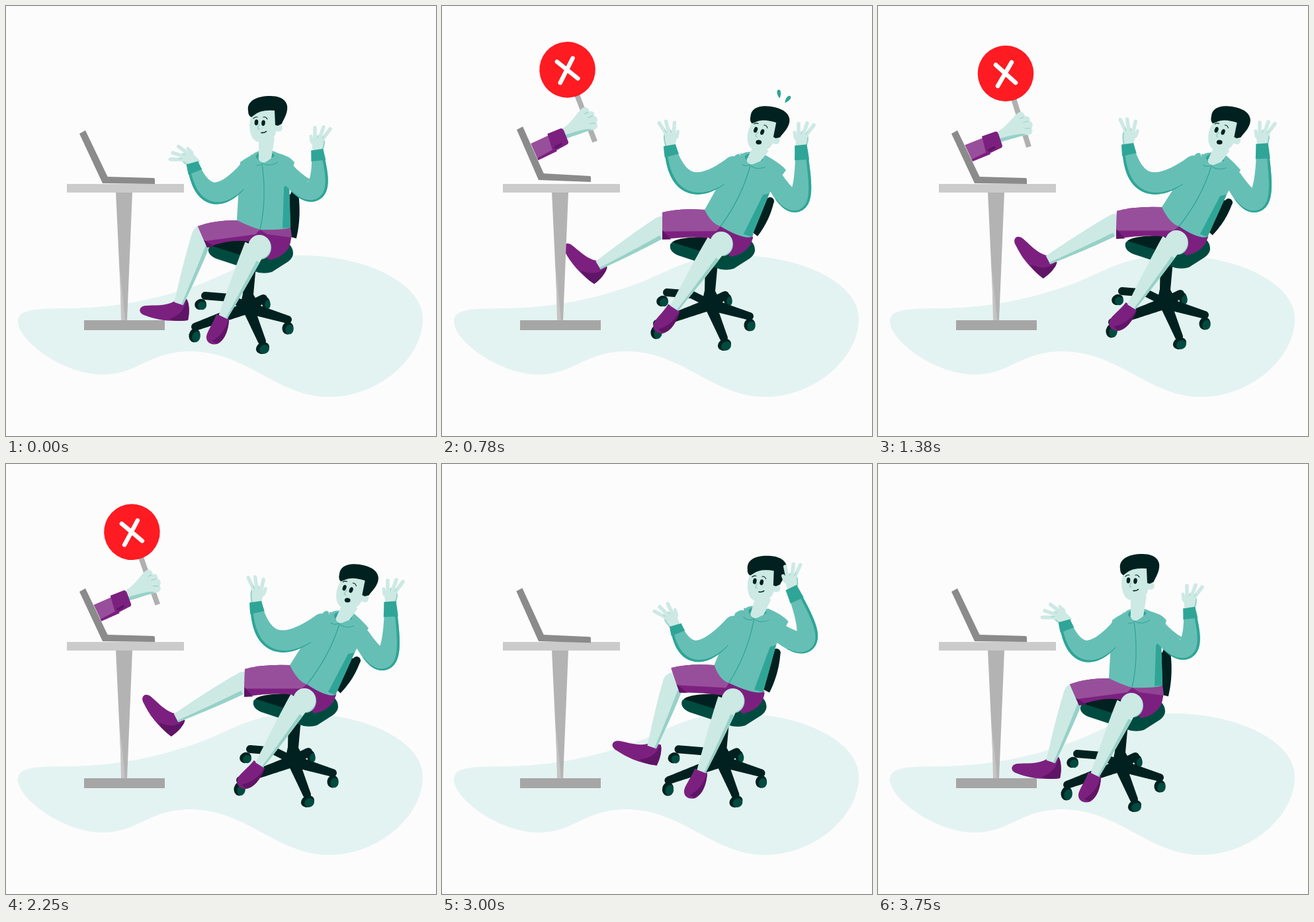
Animation of 650 by 650 pixels, one loop 4.53 s. Source, as an HTML page with a canvas:

```html
<!DOCTYPE html>
<html lang="en">
<head>
<meta charset="utf-8">
<title>Office chair</title>
<style>
html, body { margin: 0; width: 100%; height: 100%; overflow: hidden; background: #fcfcfc; }
canvas { display: block; width: 650px; height: 650px; }
</style>
</head>
<body>
<canvas id="stage" width="650" height="650"></canvas>
<script>
const ctx = document.getElementById('stage').getContext('2d');
const LOOP = 4530, STEP = 30;
const C = {
  bg: '#fcfcfc', floor: '#e3f3f1', skin: '#cde9e4', skinDark: '#97d1c8',
  teal: '#66bfb5', tealDark: '#2fa597', lilac: '#984f9b', plum: '#7c2080', plumDark: '#5f1565',
  dark: '#00211f', green: '#004b40', red: '#fe1b22',
  top: '#cbcbcb', leg: '#b3b3b3', foot: '#a6a6a6', laptop: '#8b8b8b'
};

// Body poses; every entry is blended number by number.
const sitting = {
  chair: [0, 0], back: [437, 284], head: [384, 176, 0], neck: [391, 230, 0],
  sL: [354, 236], wL: [349, 324], zip: [384, 338], hem: [430, 335], pit: [428, 268], sR: [436, 236],
  armL: [366, 247, 316, 283, 283, 242], handL: [286, 237, -52],
  armR: [425, 252, 466, 278, 471, 223], handR: [471, 219, 0],
  k1: [290, 333], k2: [304, 365], knee: [297, 347], kick: [261, 450, 0],
  step: [328, 470, 0], gasp: [0]
};
const shocked = {
  chair: [39, -5], back: [497, 294], head: [479.5, 188.5, 14], neck: [470, 233, 14],
  sL: [443, 226], wL: [397, 308], zip: [421, 333], hem: [468, 349], pit: [495, 283], sR: [520, 248],
  armL: [440, 241, 378, 267, 345, 216], handL: [345, 211, 4],
  armR: [502, 262, 538, 293, 543, 218], handR: [543, 213, 0],
  k1: [333, 312], k2: [333, 353], knee: [332, 334], kick: [236, 392, 41],
  step: [351, 457, 13], gasp: [1]
};
const recoiled = {
  chair: [68, -7], back: [531, 296], head: [517, 188.5, 14], neck: [508, 234, 14],
  sL: [480, 224], wL: [429, 304], zip: [455, 333], hem: [498, 349], pit: [527, 285], sR: [548, 248],
  armL: [477, 240, 410, 267, 378, 214], handL: [378, 208, 12],
  armR: [537, 262, 574, 293, 581, 216], handR: [581, 211, 0],
  k1: [361, 310], k2: [360, 352], knee: [359, 330], kick: [257, 384, 44],
  step: [383, 455, 18], gasp: [1]
};
const relaxing = {
  chair: [68, -7], back: [525, 288], head: [496.5, 182, 8], neck: [490, 228, 12],
  sL: [460, 224], wL: [425, 303], zip: [448, 331], hem: [497, 346], pit: [520, 275], sR: [540, 238],
  armL: [457, 242, 397, 280, 367, 234], handL: [366, 230, 2],
  armR: [525, 254, 563, 278, 556, 204], handR: [556, 199, 0],
  k1: [360, 301], k2: [367, 342], knee: [363, 325], kick: [297, 408, 30],
  step: [395, 461, 14], gasp: [0]
};
const wondering = {
  chair: [32, -6], back: [476, 282], head: [452, 175, 2], neck: [455, 226, 8],
  sL: [420, 228], wL: [387, 307], zip: [412, 331], hem: [462, 343], pit: [479, 272], sR: [495, 238],
  armL: [418, 245, 373, 284, 334, 256], handL: [332, 253, -50],
  armR: [485, 256, 532, 255, 502, 187], handR: [500, 182, -25],
  k1: [320, 322], k2: [340, 353], knee: [324, 341], kick: [328, 444, 2],
  step: [383, 468, -9], gasp: [0]
};
const BODY = [[380, sitting], [780, shocked], [1140, recoiled], [2290, recoiled],
              [2670, relaxing], [3360, wondering], [3740, sitting]];
// grip x, grip y, scale, angle
const SIGN = [[120, [110, 235, .1, 45]], [330, [168, 228, .82, 38]], [540, [210, 184, 1, 4]],
  [690, [215, 170, 1, -4]], [780, [215, 170, 1, -3.4]], [960, [214, 178, 1, 3]], [1140, [214, 176, 1, -2]],
  [1380, [214, 177, 1, 0]], [2249, [214, 177, 1, 0]], [2250, [214, 177, 1, -2]],
  [2400, [214, 178, 1, -5]], [2670, [172, 226, .84, 38]], [2880, [110, 235, .1, 45]]];
// lift, angle
const LAPTOP = [[120, [0, 0]], [570, [-3, 1]], [780, [-5, 1.5]], [930, [0, -3]], [1110, [0, 0]],
  [2300, [0, 0]], [2670, [0, -4.2]], [2790, [0, -5]], [3000, [0, 1]], [3180, [0, 0]]];
const SPARK = [[620, [0]], [740, [1]], [840, [1]], [960, [0]]];

// Monotone cubic through keyed values.
function spline(ts, vs, t) {
  const n = ts.length - 1;
  if (t <= ts[0]) return vs[0];
  if (t >= ts[n]) return vs[n];
  let i = 0;
  while (t > ts[i + 1]) i++;
  const slope = k => (vs[k + 1] - vs[k]) / (ts[k + 1] - ts[k]);
  const tangent = k => {
    if (k === 0 || k === n) return 0;
    const a = slope(k - 1), b = slope(k);
    return a * b <= 0 ? 0 : 2 * a * b / (a + b);
  };
  const h = ts[i + 1] - ts[i], u = (t - ts[i]) / h, v = 1 - u;
  return vs[i] * v * v * (1 + 2 * u) + vs[i + 1] * u * u * (3 - 2 * u)
    + h * u * v * (tangent(i) * v - tangent(i + 1) * u);
}
function blend(keys, t) {
  const ts = keys.map(k => k[0]);
  return keys[0][1].map((_, j) => spline(ts, keys.map(k => k[1][j]), t));
}
function bodyAt(t) {
  const p = {};
  for (const name in sitting) p[name] = blend(BODY.map(([at, pose]) => [at, pose[name]]), t);
  return p;
}

const mix = (a, b, u) => [a[0] + (b[0] - a[0]) * u, a[1] + (b[1] - a[1]) * u];
function local(x, y, deg, scale, draw) {
  ctx.save();
  ctx.translate(x, y);
  ctx.rotate(deg * Math.PI / 180);
  ctx.scale(scale, scale);
  draw();
  ctx.restore();
}
function shape(d, color) {
  ctx.fillStyle = color;
  ctx.fill(new Path2D(d));
}
function poly(pts, color) {
  ctx.fillStyle = color;
  ctx.beginPath();
  pts.forEach(p => ctx.lineTo(p[0], p[1]));
  ctx.closePath();
  ctx.fill();
}
function oval(x, y, rx, ry, color, rot = 0) {
  ctx.fillStyle = color;
  ctx.beginPath();
  ctx.ellipse(x, y, rx, ry, rot, 0, 7);
  ctx.fill();
}
function line(d, color, width, cap = 'round') {
  ctx.strokeStyle = color;
  ctx.lineWidth = width;
  ctx.lineCap = cap;
  ctx.lineJoin = 'round';
  ctx.stroke(new Path2D(d));
}
// Band along a curve through m, between side offsets a(t) and b(t).
function band(p, m, q, a, b, color, t0 = 0, t1 = 1) {
  const c = [2 * m[0] - (p[0] + q[0]) / 2, 2 * m[1] - (p[1] + q[1]) / 2];
  const near = [], far = [];
  for (let i = 0; i <= 24; i++) {
    const t = t0 + (t1 - t0) * i / 24;
    const s = mix(p, c, t), e = mix(c, q, t), o = mix(s, e, t);
    const len = Math.hypot(e[0] - s[0], e[1] - s[1]) || 1;
    const nx = (s[1] - e[1]) / len, ny = (e[0] - s[0]) / len;
    near.push([o[0] + nx * a(t), o[1] + ny * a(t)]);
    far.unshift([o[0] + nx * b(t), o[1] + ny * b(t)]);
  }
  poly(near.concat(far), color);
}

function drawFloor() {
  ctx.fillStyle = C.bg;
  ctx.fillRect(0, 0, 650, 650);
  shape('M18 477C18 456 50 458 100 457C180 455 240 440 300 418C345 400 375 377 445 377C545 377 630 420 630 472C630 535 560 591 489 591C410 591 365 523 280 522C215 522 200 557 146 557C85 557 18 505 18 477Z', C.floor);
}

function drawTable() {
  shape('M166 281H191L183 475H175Z', C.leg);
  shape('M172 395L180 475H174Z', '#c4c4c4');
  shape('M118 475H240V490H118Z', C.foot);
  shape('M92 269H269V282H92Z', C.top);
}

function drawSign([x, y, s, rot]) {
  local(x, y, rot, s, () => {
    line('M-21-75L14 36', '#b0b0b0', 8, 'butt');
    oval(-21, -75, 42.3, 42.3, C.red);
    line('M-36-88L-6-61M-12-92L-33-56', '#fff', 6.5);
    shape('M-100 40L-52 21L-46 47L-94 65Z', C.lilac);
    shape('M-73 55L-46 42L-44 47L-76 60Z', C.plum);
    shape('M-37 15C-22 8-14-5-3-15C2-19 8-16 8-10C14-12 17-7 15-3C20-2 21 4 18 8C22 13 17 19 10 18C0 20-12 24-31 29Z', C.skin);
    shape('M-31 29C-12 24 0 20 10 18C8 14-8 17-33 24Z', C.skinDark);
    line('M6-9L1-7M13-3L6-1M16 8L8 8', C.skinDark, 1.2);
    shape('M-57 20L-37 13Q-34 12-32 16L-26 34Q-26 37-29 38L-50 48Z', C.plum);
    line('M-46 41L-38 37', C.plumDark, 4);
  });
}

function drawLaptop([lift, rot], sign) {
  local(148, 268 + lift, rot, 1, () => {
    ctx.translate(-148, -268);
    shape('M146 268L152 258L223 260Q225 260 225 263V269Z', C.laptop);
    shape('M111 193L120 188L155 261L146 268Z', C.laptop);
    ctx.clip(new Path2D('M18-28H700V300H174Z'));
    // The raised arm moves in stage space, only its cut follows the lid.
    ctx.setTransform(1, 0, 0, 1, 0, 0);
    if (sign[2] > .12) drawSign(sign);
  });
}

function caster(x, y, rx, ry, rot) {
  oval(x, y, rx, ry, C.dark, rot);
  oval(x + 2.5, y + 2, rx * .72, ry * .78, C.green, rot);
}
// One spoke of the chair base, tapering away from the hub.
function spoke(x, y) {
  const hub = [366, 456], tip = [x, y];
  band(hub, mix(hub, tip, .5), tip, t => 9 - 3 * t, t => 3 * t - 9, C.dark);
  oval(x, y, 6, 6, C.dark);
}

function drawChair(p) {
  const [cx, cy] = p.chair, foot = [434 + cx, 350 + cy];
  const mid = mix(p.back, foot, .5);
  band(p.back, [mid[0] + 3, mid[1] + 1], foot, t => 16, t => -5, C.dark);
  oval(p.back[0] - 1, p.back[1] + 1, 6, 6, C.dark);
  local(cx, cy, 0, 1, () => {
    caster(393, 449, 6, 9, 0);
    spoke(389, 442);
    shape('M359 392H378L374 436L385 456L352 462L358 435Z', C.dark);
    line('M360 452L338 441L301 438', C.dark, 12);
    caster(294, 451, 9, 8, -.4);
    spoke(286, 485);
    spoke(387, 507);
    spoke(426, 474);
    caster(285, 498, 8.5, 10.5, .2);
    caster(388, 517, 10.5, 8.5, -.5);
    caster(426, 487, 8.5, 9.5, .2);
    shape('M306 366C308 358 335 355 360 354H420C430 360 434 366 434 374C434 380 428 386 424 388L402 402Q394 405 382 403L318 382Q304 376 306 366Z', C.green);
    shape('M309 362C316 356 338 354 362 354L420 352L372 382Z', C.dark);
  });
}

function drawLegs(p) {
  const [cx, cy] = p.chair, [kx, ky, kr] = p.kick, [nx, ny, nr] = p.step;
  local(kx, ky, kr, 1, () => {
    shape('M-6-4C-18 4-38 2-50 3C-61 4-62 15-50 18C-34 24-14 28 14 25C17 13 16-1 12-7Z', C.plum);
    shape('M14 25C17 13 16-1 12-7C9 8 4 16-14 23C-8 26 2 27 14 25Z', C.plumDark);
  });
  const calf = t => 16 - 9 * Math.pow(t, 1.4);
  const ankle = [kx, ky], mid = mix(p.knee, ankle, .5);
  oval(p.knee[0], p.knee[1], 16, 16, C.skin);
  band(p.knee, mid, ankle, calf, t => -calf(t), C.skin);
  band(p.knee, mid, ankle, t => -calf(t) * .6, t => -calf(t), C.skinDark, .08);

  const hip = [432 + cx, 350 + cy], seat = [398 + cx, 384 + cy], lap = [366 + cx, 356 + cy];
  const rise = mix(p.k1, p.wL, .45);
  const thigh = (color, trace) => {
    ctx.fillStyle = color;
    ctx.beginPath();
    ctx.moveTo(...p.k1);
    ctx.quadraticCurveTo(rise[0] - 3, rise[1] - 5, ...p.wL);
    trace();
    ctx.closePath();
    ctx.fill();
  };
  thigh(C.plum, () => {
    ctx.lineTo(...p.hem);
    ctx.quadraticCurveTo(hip[0] + 2, hip[1], hip[0] - 5, hip[1] + 16);
    ctx.quadraticCurveTo(hip[0] - 14, hip[1] + 30, ...seat);
    ctx.lineTo(...lap);
    ctx.quadraticCurveTo(lap[0] - 28, lap[1] - 4, ...p.k2);
  });
  thigh(C.lilac, () => {
    ctx.lineTo(...p.zip);
    ctx.lineTo(...mix(p.zip, lap, .4));
    ctx.lineTo(...mix(p.k1, p.k2, .7));
  });
  poly([p.zip, p.hem, hip, [395 + cx, 345 + cy]], '#8f4393');
  poly([mix(p.k1, p.k2, .65), p.k2, mix(p.k2, lap, .18)], C.plumDark);

  const knee = [377 + cx, 364 + cy], end = [nx, ny];
  const shin = t => 17 - 10 * Math.pow(t, 1.2), half = mix(knee, end, .5);
  local(nx, ny, nr, 1, () => {
    shape('M-10-4L9 2C9 16 4 36-9 41C-19 43-26 38-25 29C-23 20-15 10-10-4Z', C.plum);
    shape('M-10 40C4 36 9 16 9 2C4 18-2 28-16 36Z', C.plumDark);
  });
  oval(knee[0] + 8, knee[1] + 1, 16, 18, C.skinDark);
  oval(knee[0] + 6, knee[1], 17, 18, C.skin);
  band(knee, half, end, shin, t => -shin(t), C.skin);
  band(knee, half, end, t => -shin(t) * .65, t => -shin(t), C.skinDark, .16);
}

function drawTorso(p) {
  const [x, y] = p.neck;
  ctx.fillStyle = C.teal;
  ctx.beginPath();
  ctx.moveTo(x - 19, y - 5);
  ctx.quadraticCurveTo(p.sL[0] + 8, p.sL[1] - 6, ...p.sL);
  ctx.lineTo(...p.wL);
  ctx.quadraticCurveTo(p.zip[0] - 14, p.zip[1] - 4, ...p.zip);
  ctx.quadraticCurveTo(p.hem[0] - 14, p.hem[1] + 4, ...p.hem);
  ctx.lineTo(...p.pit);
  ctx.lineTo(...p.sR);
  ctx.quadraticCurveTo(p.sR[0] - 8, p.sR[1] - 10, x + 18, y - 8);
  ctx.fill();
  poly([p.pit, p.hem, mix(p.hem, p.zip, .26), mix(p.pit, p.wL, .1)], C.tealDark);
  const bow = mix([x, y + 8], p.zip, .5);
  line(`M${x - 4} ${y + 8}Q${bow[0] + 7} ${bow[1] + 4} ${p.zip}`, C.tealDark, 1.3);
}

function drawHead(p) {
  const [x, y, rot] = p.head, [nx, ny, tilt] = p.neck, open = p.gasp[0];
  const a = rot * Math.PI / 180;
  const jaw = [x + 10 * Math.cos(a) - 22 * Math.sin(a), y + 10 * Math.sin(a) + 22 * Math.cos(a)];
  local(nx, ny, tilt, 1, () => {
    oval(2, -1, 22, 11, C.teal);
    oval(1, -2, 14, 8, C.tealDark);
  });
  band(jaw, mix(jaw, [nx, ny], .5), [nx, ny], t => 12 - t * 3, t => t * 2 - 12, C.skin);
  oval(nx, ny, 9.5, 7, C.skin);
  local(nx, ny, tilt, 1, () => {
    shape('M-21-6C-14-4-11 1-8 5Q-2 9 3 5C9 1 14-3 20-8C25-2 24 5 18 9Q8 13-3 9Q-12 15-17 8Z', C.teal);
    line('M-19 8Q-10 14-3 8Q8 14 20 6', C.tealDark, 1);
  });
  local(x, y, rot, 1, () => {
    oval(28, 8, 6, 6, C.skin);
    shape('M-13-10C-18 2-16 14-12 22C-8 30 2 32 8 30C18 28 25 20 25 8L25-18L-8-20Z', C.skin);
    shape('M-18-18C-20-32-6-40 16-40C36-40 43-29 41-19C40-10 34-2 33 2L27 5L23 4L22-18Q1-20-9-11L-13-8Q-18-10-18-18Z', C.dark);
    oval(-5.5, 0, 2.8, 4.4, C.dark, .1);
    oval(5, .8, 2.8, 4.4, C.dark, .1);
    const up = open * 2;
    line(`M-10 ${-6 - up}Q-7 ${-9 - up}-4 ${-8 - up}M5 ${-8 - up}Q9 ${-9 - up} 11 ${-5 - up}`, C.dark, 1.1);
    line('M-1 3Q-6 10-1 10', C.skinDark, 1.5);
    if (open > .3) oval(3.5, 17, 4.4, 3.4 * open, C.dark, -.15);
    else line('M2 15.5Q7 16 9.5 13.5', C.dark, 1.6);
  });
}

function drawSpark(p, size) {
  if (size < .02) return;
  const [x, y] = p.head;
  const drop = 'M0 0C-4-5-4-13 0-13C4-13 3-5 0 0Z';
  local(x + 31, y - 49, -7, size, () => shape(drop, C.tealDark));
  local(x + 39, y - 42, 38, size, () => shape(drop, C.tealDark));
}

function drawHand([x, y, rot], flip) {
  local(x, y, rot, 1, () => {
    ctx.scale(flip, 1);
    shape('M-7 4C-8-6-10-14-7-20C-2-25 9-23 11-18C12-10 8-2 7 4Z', C.skin);
    line('M-4-18L-4-35M3-19L9-36M7-17L19-33', C.skin, 5.5);
    line('M-4-8L-9-14L-10-22', C.skin, 5);
    line('M0-20L1-24M7-19L10-23', C.skinDark, 1);
    line('M6 2Q10-7 10-14', C.skinDark, 2);
  });
}

function drawArm(arm, hand, side) {
  const [sx, sy, mx, my, wx, wy] = arm;
  const wrist = [wx, wy], mid = [mx, my], top = [sx, sy];
  // Narrow at the cuff, fullest past the elbow, rounded into the shoulder.
  const w = t => 9 + 5 * t + 5 * Math.sin(Math.PI * t);
  drawHand(hand, side);
  band(wrist, mid, top, w, t => -w(t), C.teal);
  oval(sx, sy, 14, 14, C.teal);
  band(wrist, mid, top, t => -side * w(t) * (.6 + .4 * t), t => -side * w(t), C.tealDark, 0, .85);
  band(wrist, mid, top, t => w(t) + .8, t => -w(t) - .8, C.tealDark, -.03, .06);
}

function render(t) {
  const p = bodyAt(t);
  drawFloor();
  drawChair(p);
  drawLegs(p);
  drawTorso(p);
  drawHead(p);
  drawArm(p.armL, p.handL, -1);
  drawArm(p.armR, p.handR, 1);
  drawSpark(p, blend(SPARK, t)[0]);
  drawTable();
  drawLaptop(blend(LAPTOP, t), blend(SIGN, t));
}

const start = performance.now();
function tick() {
  const t = (performance.now() - start) % LOOP;
  render(Math.floor(t / STEP) * STEP);
  requestAnimationFrame(tick);
}
tick();
</script>
</body>
</html>
```
